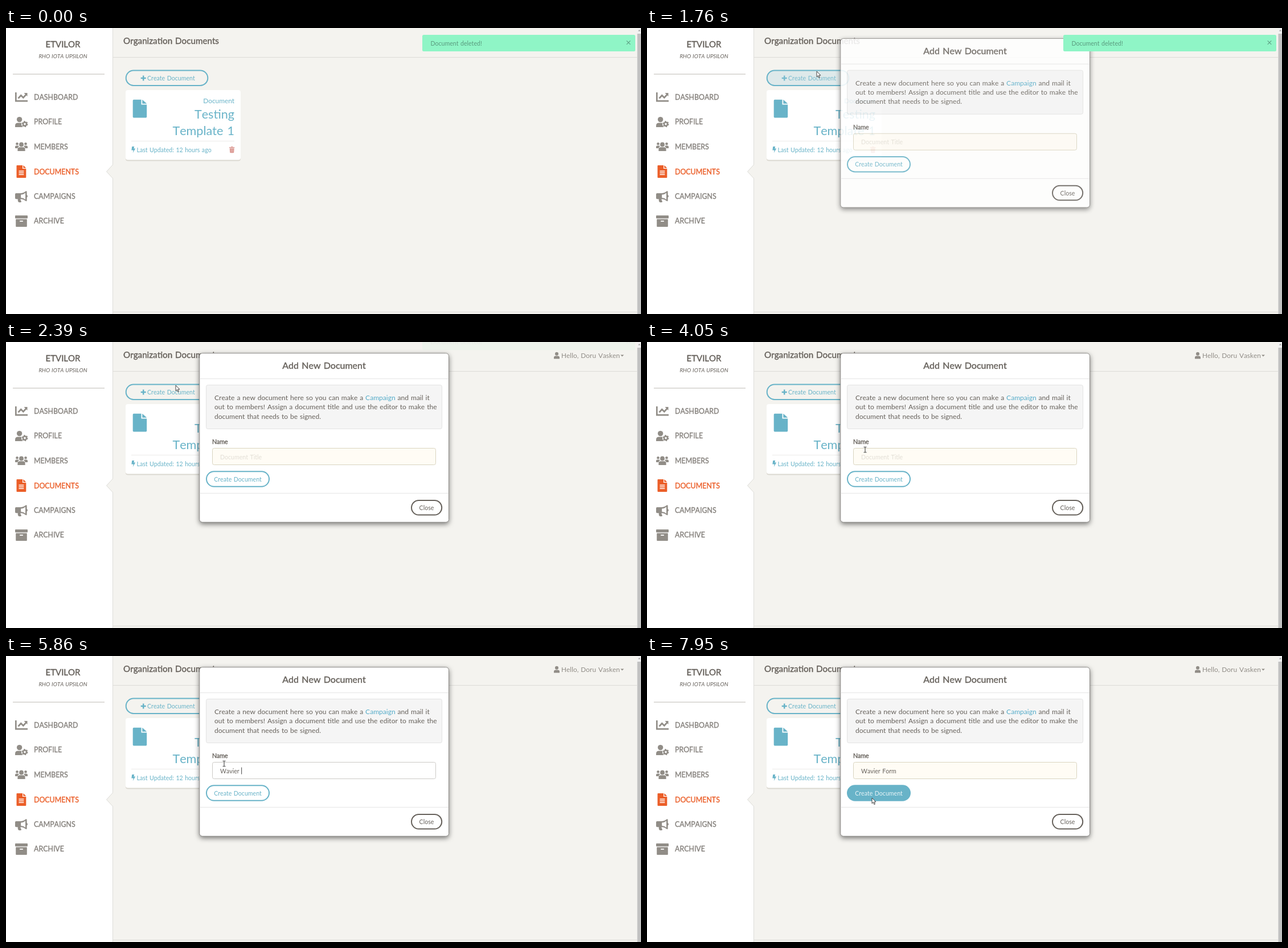
Recreate the animation shown at these times as an HTML page. Size 1115 by 502 pixels, loop 8000 ms.

```html
<!DOCTYPE html>
<html lang="en">
<head>
<meta charset="utf-8">
<title>Organization Documents</title>
<style>
  html, body { margin: 0; width: 100%; height: 100%; overflow: hidden; background: #f4f3ef; }
  svg { display: block; width: 1115px; height: 502px; }
  text { font: 10.6px Lato, "Open Sans", sans-serif; font-kerning: none; word-spacing: .07em; fill: #66615b; white-space: pre; }
  .semi { stroke: #66615b; stroke-width: .4; }
  .mid { text-anchor: middle; }
  .end { text-anchor: end; }
  .menu text { font-size: 12.4px; fill: #85817c; stroke: #85817c; stroke-width: .35; }
  .menu { fill: #918d87; }
  .menu .active, .menu .active text { fill: #eb5e28; }
  .menu .active text { stroke: #eb5e28; }
  .blue, text.blue { fill: #68b3c8; }
  .rule { stroke: #dddcd8; }
  .button { fill: #68b3c8; fill-opacity: 0; stroke: #68b3c8; stroke-width: 2; }
  .card-title text { font-size: 21.6px; }
  .info text { font-size: 12.05px; }
  .cursor { fill: #fff; stroke: #333; stroke-width: .9; stroke-linejoin: round; }
</style>
</head>
<body>
<svg viewBox="0 0 1115 502">
  <rect width="1115" height="502" fill="#f4f3ef"/>

  <!-- sidebar -->
  <rect width="187" height="502" fill="#fff"/>
  <path class="rule" d="M187.5 0V240L176.5 252L187.5 264V502" fill="#f4f3ef"/>
  <text class="semi mid" x="100" y="34" style="font-size:15px">ETVILOR</text>
  <text class="mid" x="100" y="53" style="font-size:9.7px;font-style:italic">RHO IOTA UPSILON</text>
  <path d="M12 81H173" stroke="#d3d1cd" stroke-width="1.3"/>
  <g class="menu">
    <g>
      <path d="M17.3 113V128.2H38M21.5 123.5L26.3 118.3L30.3 122.3L35.5 116.5" fill="none" stroke="#918d87" stroke-width="2.7"/>
      <path d="M31.5 114H37.5V120Z"/>
      <text x="49" y="126">DASHBOARD</text>
    </g>
    <g>
      <circle cx="23.6" cy="160.6" r="4.7"/>
      <path d="M16 174V171.5Q16 166.5 21 166.5H27Q26.5 171 29.5 174Z"/>
      <circle cx="33" cy="168.6" r="3.1" fill="none" stroke="#918d87" stroke-width="2.6"/>
      <circle cx="33" cy="168.6" r="4.7" fill="none" stroke="#918d87" stroke-width="1.6" stroke-dasharray="2.46"/>
      <text x="49" y="169.4">PROFILE</text>
    </g>
    <g>
      <circle cx="19.5" cy="203.2" r="2.3"/><circle cx="34.5" cy="203.2" r="2.3"/><circle cx="27" cy="204.5" r="3.9"/>
      <path d="M16 211V208.5Q16 206.4 18.2 206.4H21Q22.4 206.4 23 207.6Q20.8 208.8 20.4 211ZM38 211V208.5Q38 206.4 35.8 206.4H33Q31.6 206.4 31 207.6Q33.2 208.8 33.6 211ZM20.4 216V213Q20.4 209.3 24 209.3H30Q33.6 209.3 33.6 213V216Z"/>
      <text x="49" y="213">MEMBERS</text>
    </g>
    <g class="active">
      <path d="M19.5 241H29V247H35.3V262Q35.3 263 34.3 263H19.5Q18.5 263 18.5 262V242Q18.5 241 19.5 241ZM30.3 241L35.3 245.8H30.3Z"/>
      <path d="M22.5 251.3H31.3M22.5 254.3H31.3M22.5 257.3H31.3" stroke="#fff" stroke-width="1.4"/>
      <text x="49" y="256.5">DOCUMENTS</text>
    </g>
    <g>
      <path fill-rule="evenodd" d="M17.7 290H25Q31 290 35 286.3Q36.6 286 36.6 287.5V293Q38 293.7 38 295.2Q38 296.7 36.6 297.4V303Q36.6 304.3 35 304Q31 300.5 25.5 300.3Q25 302.5 27 304.5Q27 305.8 25.8 306H22.5Q20.2 304 20.6 300.3H17.7Q16 300.3 16 298.6V291.7Q16 290 17.7 290ZM26.2 292.5V298Q30.5 298.2 34 301V289.4Q30.5 292.3 26.2 292.5Z"/>
      <text x="49" y="300">CAMPAIGNS</text>
    </g>
    <g>
      <rect x="16" y="329" width="22" height="5.3" rx="1"/>
      <rect x="17.2" y="335.6" width="19.6" height="13.4" rx="1"/>
      <rect x="24" y="338.3" width="6" height="1.7" rx=".8" fill="#fff"/>
      <text x="49" y="343.4">ARCHIVE</text>
    </g>
  </g>

  <!-- page header -->
  <path class="rule" d="M188 51.5H1108M188 498.5H1108"/>
  <text class="semi" x="206" y="28" style="font-size:15.2px">Organization Documents</text>
  <g fill="#918d87">
    <circle cx="967" cy="20.8" r="3"/>
    <path d="M962 29.5V27.5Q962 24.5 965 24.5H969Q972 24.5 972 27.5V29.5Z"/>
    <path d="M1079 22.5H1085L1082 25.6Z"/>
    <text x="975" y="27.6" style="font-size:11.9px;fill:#918d87">Hello, Doru Vasken</text>
  </g>

  <!-- document list -->
  <rect id="openButton" class="button" x="210.7" y="74.5" width="143.6" height="26.4" rx="13.2"/>
  <g id="openLabel" class="blue">
    <path d="M240 83.5H242.4V86.8H245.7V89.2H242.4V92.5H240V89.2H236.7V86.8H240Z"/>
    <text x="248" y="91.7" style="fill:inherit">Create Document</text>
  </g>
  <rect x="210" y="110.5" width="202" height="123" rx="4" fill="#dcd9d1"/>
  <rect x="210" y="109" width="202" height="122.5" rx="4" fill="#fff"/>
  <path class="blue" d="M224.3 125.8H237.5V134.5H247.2V155.8Q247.2 157.4 245.6 157.4H224.3Q222.7 157.4 222.7 155.8V127.4Q222.7 125.8 224.3 125.8ZM239.3 125.8L247.2 132.8H239.3Z"/>
  <text class="blue end" x="401" y="132" style="font-size:11.85px">Document</text>
  <g class="card-title">
    <text class="blue end" x="401" y="158.6">Testing</text>
    <text class="blue end" x="401" y="187.8">Template 1</text>
  </g>
  <path d="M220 198.5H401" stroke="#ecebe8"/>
  <path class="blue" d="M221.3 208H225.2L224.3 211.5H227.2L222.8 219.2L223.7 214.4H220.3Z"/>
  <text class="blue" x="229.5" y="217.5">Last Updated: 12 hours ago</text>
  <path fill="#dc9a94" d="M392 209H395L395.6 208H398L398.6 209H401.3V210.5H392ZM392.7 211.2H400.7L400.2 218.2Q400.1 219.2 399.1 219.2H394.3Q393.3 219.2 393.2 218.2Z"/>
  <path d="M395 212.6V217.8M396.7 212.6V217.8M398.4 212.6V217.8" stroke="#eabfba" stroke-width=".6"/>

  <!-- scrollbar -->
  <rect x="1108" width="7" height="502" fill="#f1f1f1"/>
  <rect x="1108.5" y="10" width="6.5" height="492" fill="#c1c1c1"/>
  <path d="M1110 5.5L1112 3L1114 5.5Z" fill="#999"/>

  <!-- dialog -->
  <g id="dialog">
    <rect x="339.8" y="19.7" width="437.7" height="296.6" rx="5" fill="#fff" stroke="#8d8b88" style="filter:drop-shadow(0 3px 4px rgba(0,0,0,.5))"/>
    <text class="semi mid" x="558.5" y="47.3" style="font-size:16px">Add New Document</text>
    <path d="M340.5 64.5H776.5M340.5 265.5H776.5" stroke="#e5e5e5"/>
    <rect x="351.5" y="75.5" width="414" height="77" rx="3" fill="#f5f5f5" stroke="#e3e3e3"/>
    <g class="info">
      <text x="366" y="101.8">Create a new document here so you can make a <tspan fill="#55acc9">Campaign</tspan> and mail it</text>
      <text x="366" y="118.2">out to members! Assign a document title and use the editor to make the</text>
      <text x="366" y="134.6">document that needs to be signed.</text>
    </g>
    <text class="semi" x="362" y="179">Name</text>
    <rect id="field" x="362.5" y="186.5" width="392" height="29" rx="3"/>
    <text id="value" x="376" y="205.5"></text>
    <path id="caret" d="M0 195.5V207.5" stroke="#444"/>
    <rect id="saveButton" class="button" x="352" y="227.3" width="110" height="26.4" rx="13.2"/>
    <text id="saveLabel" class="mid" x="407" y="244.5">Create Document</text>
    <rect x="712" y="278" width="53.2" height="25.6" rx="12.8" fill="#fff" stroke="#66615b" stroke-width="2"/>
    <text class="mid" x="738.5" y="294.8">Close</text>
  </g>

  <!-- alert -->
  <g id="alert">
    <rect x="731" y="12" width="374" height="29" rx="2.5" fill="#8ff5c6"/>
    <text x="745.5" y="30.5" style="fill:#5a9a7e">Document deleted!</text>
    <path d="M1089.7 22.3L1096.3 28.9M1096.3 22.3L1089.7 28.9" stroke="#5fa387" stroke-width="1.2"/>
  </g>

  <g id="pointer">
    <path id="arrow" class="cursor" d="M0 0V9.8L2.3 7.7L3.9 11.6L5.5 10.9L3.9 7.1H6.9Z"/>
    <path id="hand" class="cursor" d="M-.9 .9Q-.9 -.2 .1 -.2Q1.1 -.2 1.1 .9V4.2Q2.2 3.7 2.9 4.6Q4 4.2 4.6 5.1Q6.2 4.8 6.2 6.3V8.8Q6 10.2 5.2 11.2V12.4H-.3V11.3Q-2 9.5 -3.4 6.8Q-3.3 5.6 -2.2 6L-.9 7.3Z"/>
    <path id="beam" d="M-2.5 -4.8H-.7L0 -4.2L.7 -4.8H2.5M0 -4.2V4.2M-2.5 4.8H-.7L0 4.2L.7 4.8H2.5" fill="none" stroke="#444" stroke-width="1.1"/>
  </g>
</svg>
<script>
const LOOP = 8000;
const el = Object.fromEntries([...document.querySelectorAll('[id]')].map(node => [node.id, node]));

// Rows are [time, value, ...]
const pointerPath = [
  [230, 891, 416], [360, 592, 223], [560, 592, 223], [710, 308, 68], [910, 308, 68], [1110, 298, 76],
  [3400, 298, 76], [3900, 383, 189], [6850, 383, 189], [6950, 393, 240], [7000, 395, 253], [7050, 395, 249]
];
const openFill = [[1235, 0], [1500, 1], [1550, 1], [1800, 0]];
const saveFill = [[6990, 0], [7260, 1]];
const typing = [
  [4900, 1], [5100, 2], [5300, 3], [5500, 5], [5860, 7], [6110, 8], [6310, 10], [6410, 11]
];

const progress = (t, start, length) => Math.min(1, Math.max(0, (t - start) / length));

function tween(keys, t) {
  const next = keys.findIndex(key => key[0] > t);
  if (next < 0) return keys.at(-1).slice(1);
  if (next === 0) return keys[0].slice(1);
  const a = keys[next - 1], b = keys[next];
  const p = progress(t, a[0], b[0] - a[0]);
  return a.slice(1).map((v, i) => v + (b[i + 1] - v) * p);
}

// cubic-bezier(.25, .1, .25, 1)
function ease(x) {
  const curve = (s, p, q) => 3 * (1 - s) ** 2 * s * p + 3 * (1 - s) * s * s * q + s ** 3;
  let low = 0, high = 1;
  for (let i = 0; i < 20; i++) {
    const mid = (low + high) / 2;
    if (curve(mid, .25, .25) < x) low = mid; else high = mid;
  }
  return curve(low, .1, 1);
}

function show(node, visible) {
  node.style.display = visible ? '' : 'none';
}

function paintButton(button, label, amount, whiteness) {
  button.style.fillOpacity = amount;
  label.style.fill = `color-mix(in srgb, #fff ${amount * whiteness}%, #68b3c8)`;
}

function drawField(t) {
  const focused = t >= 4430 && t < 7700;
  el.field.setAttribute('fill', focused ? '#fff' : '#fffcf5');
  el.field.setAttribute('stroke', focused ? '#cccac6' : '#d9d4c0');
  const count = typing.findLast(key => t >= key[0])?.[1] ?? 0;
  el.value.textContent = count ? 'Wavier Form'.slice(0, count) : 'Document Title';
  el.value.style.fill = count ? '#66615b' : '#e2ded5';
  show(el.caret, focused && t < 6410);
  const caretX = 376.5 + (count ? el.value.getComputedTextLength() : 0);
  el.caret.setAttribute('transform', `translate(${caretX})`);
}

function drawPointer(t) {
  const [x, y] = tween(pointerPath, t);
  const beam = t >= 3800 && t < 6930;
  const hand = (t >= 1060 && t < 1550) || (t >= 6930 && t < 7700);
  show(el.pointer, t >= 230);
  show(el.beam, beam);
  show(el.hand, hand);
  show(el.arrow, !beam && !hand);
  el.pointer.setAttribute('transform', `translate(${x} ${y})`);
}

function draw(t) {
  paintButton(el.openButton, el.openLabel, tween(openFill, t)[0], 70);
  paintButton(el.saveButton, el.saveLabel, tween(saveFill, t)[0], t < 7950 ? 70 : 85);

  const opening = progress(t, 1500, 300);
  show(el.dialog, opening > 0);
  el.dialog.style.opacity = opening;
  el.dialog.setAttribute('transform', `translate(0 ${-75 * (1 - opening) ** 2})`);

  const leaving = ease(progress(t, 1855, 800));
  el.alert.style.opacity = 1 - leaving;
  el.alert.setAttribute('transform', `translate(0 ${-29 * leaving})`);

  drawField(t);
  drawPointer(t);
}

const start = performance.now();
function frame() {
  draw((performance.now() - start) % LOOP);
  requestAnimationFrame(frame);
}
frame();
</script>
</body>
</html>
```
